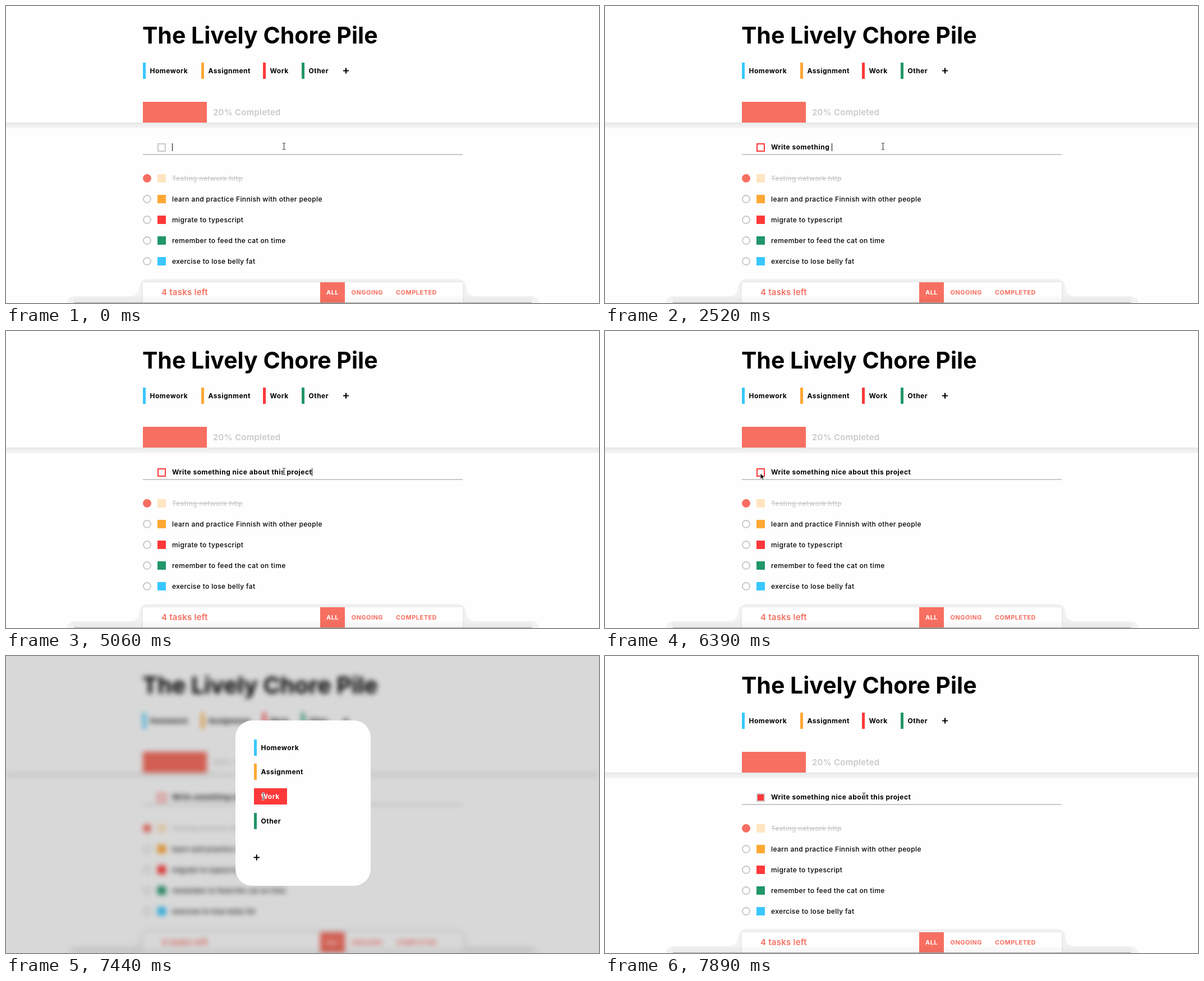
Write an HTML page that moves like this. It is 1057 px wide and 530 px high and loops after 8 s.

```html
<!DOCTYPE html>
<html lang="en">
<head>
<meta charset="utf-8">
<title>To-do list</title>
<style>
  html, body { margin: 0; width: 100%; height: 100%; overflow: hidden; background: #fefefe; }
  #stage { position: relative; width: 1057px; height: 530px; overflow: hidden; font: 500 12px Inter, sans-serif; letter-spacing: .031em; }
  #page, svg { position: absolute; left: 0; top: 0; width: 1057px; height: 530px; }
  #page.blurred { filter: blur(5px); }
  #shade { position: absolute; inset: 0; background: rgba(0, 0, 0, .15); }
  #entry { position: absolute; left: 296px; top: 245px; height: 14px; display: flex; align-items: center; white-space: pre; line-height: 14px; }
  #caret { width: 1px; height: 14px; background: #000; }
  .bold { font-weight: 700; letter-spacing: .041em; }
  .title { font-size: 41px; font-weight: 700; letter-spacing: 0; }
  .info { font-size: 15px; font-weight: 600; letter-spacing: .016em; }
  .tab { font-size: 11px; font-weight: 700; letter-spacing: .042em; fill: #f76f61; }
  .done { fill: #c9c9c9; text-decoration: line-through; }
  .panel { filter: drop-shadow(0 0 2px rgba(0, 0, 0, .08)); }
</style>
</head>
<body>
<div id="stage">
  <div id="page">
    <svg viewBox="0 0 1057 530">
      <defs>
        <linearGradient id="edge" x2="0" y2="1">
          <stop offset="0" stop-color="#e2e2e2"/>
          <stop offset=".3" stop-color="#eee"/>
          <stop offset="1" stop-color="#f5f5f5"/>
        </linearGradient>
        <linearGradient id="fade" x2="0" y2="1">
          <stop offset="0" stop-opacity=".01"/>
          <stop offset="1" stop-opacity=".04"/>
        </linearGradient>
      </defs>
      <rect width="1057" height="530" fill="#fefefe"/>
      <rect y="208" width="1057" height="10" fill="url(#edge)"/>
      <text class="title" x="243" y="67">The Lively Chore Pile</text>
      <g id="tags"></g>
      <path d="M601 115.500h10M606 110.500v10" stroke="#000" stroke-width="2.200"/>
      <rect x="244" y="171" width="114" height="37" fill="#f76f61"/>
      <text class="info" x="369" y="195" fill="#c9c9c9">20% Completed</text>
      <rect x="244" y="264" width="570" height="2" fill="#c9c9c9"/>
      <rect id="box" x="271" y="246" width="13" height="13" stroke-width="2"/>
      <g id="tasks"></g>
      <path d="M108 530Q110 518 124 518H222Q236 516 237 504Q238 487 255 487H803Q820 487 821 504Q822 516 836 518H935Q949 518 951 530Z" fill="#f2f2f2"/>
      <rect class="panel" x="244" y="493" width="570" height="40" fill="#fefefe"/>
      <rect x="560" y="493" width="44" height="37" fill="#f76f61"/>
      <rect x="120" y="518" width="818" height="12" fill="url(#fade)"/>
      <rect x="121" y="529" width="816" height="1" fill="#a2a2a2"/>
      <text class="info" x="277" y="516" fill="#f76f61">4 tasks left</text>
      <text class="tab" x="571" y="515" style="fill:#fff">ALL</text>
      <text class="tab" x="615.500" y="515">ONGOING</text>
      <text class="tab" x="695" y="515">COMPLETED</text>
    </svg>
    <div id="entry" class="bold"><span id="typed"></span><i id="caret"></i></div>
  </div>
  <div id="modal">
    <div id="shade"></div>
    <svg viewBox="0 0 1057 530">
      <rect x="409" y="115" width="241" height="295" rx="30" fill="#fefefe"/>
      <g id="choices"></g>
      <path d="M441.500 359.500h10.500M446.750 354.250v10.500" stroke="#000" stroke-width="2"/>
    </svg>
  </div>
  <svg viewBox="0 0 1057 530">
    <g id="beam" fill="none">
      <path d="M-2.500-6Q0-6 0-4Q0-6 2.500-6M0-4V4M-2.500 6Q0 6 0 4Q0 6 2.500 6" stroke="#fff" stroke-width="2.600"/>
      <path d="M-2.500-6Q0-6 0-4Q0-6 2.500-6M0-4V4M-2.500 6Q0 6 0 4Q0 6 2.500 6" stroke="#222"/>
    </g>
    <path id="arrow" d="M0 0V10.200L2.400 8L4 11.800L5.800 11L4.200 7.300H7.400Z" fill="#000" stroke="#fff" stroke-width=".8"/>
  </svg>
</div>
<script>
const $ = id => document.getElementById(id);
const GREY = '#c9c9c9', RED = '#ff3839', AMBER = '#ffa834', GREEN = '#219669', BLUE = '#39c7ff', CORAL = '#f76f61';
const LOOP = 8000;
const TEXT = 'Write something nice about this project';

const rect = (x, y, w, h, fill) => `<rect x="${x}" y="${y}" width="${w}" height="${h}" fill="${fill}"/>`;
const label = (x, y, text, cls = '', fill = '#000') =>
  `<text class="${cls}" x="${x}" y="${y}" fill="${fill}">${text}</text>`;

const tags = [['Homework', BLUE, 244], ['Assignment', AMBER, 348], ['Work', RED, 458], ['Other', GREEN, 527]];
$('tags').innerHTML = tags.map(([name, color, x]) =>
  rect(x, 101, 5, 29, color) + label(x + 12.5, 120, name, 'bold')).join('');

const drawChoices = hover => {
  $('choices').innerHTML = tags.map(([name, color], i) => {
    const y = Math.round(148.5 + i * 43.8), on = hover && name === 'Work';
    return rect(442, y, on ? 59 : 5, 29, color) +
      label(454.5, y + 18.5, name, 'bold', on ? '#fff' : '#000');
  }).join('');
};

const tasks = [
  ['Testing network http', '#ffe5c1'],
  ['learn and practice Finnish with other people', AMBER],
  ['migrate to typescript', RED],
  ['remember to feed the cat on time', GREEN],
  ['exercise to lose belly fat', BLUE]
];
$('tasks').innerHTML = tasks.map(([text, color], i) => {
  const y = 307.5 + i * 37, done = i === 0;
  return `<circle cx="251.500" cy="${y}" r="6.500" stroke-width="2" stroke="${done ? CORAL : GREY}" fill="${done ? CORAL : 'none'}"/>` +
    rect(270, y - 7.5, 15, 15, color) + label(296, y + 4, text, done ? 'done' : '');
}).join('');

// [time, letters typed]
const typing = [
  [0, 0], [740, 1], [1040, 2], [1190, 3], [1340, 5], [1480, 6], [1630, 7], [1780, 8], [1930, 10],
  [2220, 12], [2370, 14], [2520, 16], [2670, 17], [2820, 18], [2970, 20], [3120, 21], [3270, 23],
  [3570, 25], [3720, 26], [3860, 28], [4010, 30], [4160, 31], [4310, 32], [4460, 34], [4610, 35],
  [4760, 36], [4910, 38], [5060, 39]
];
const caret = [[0, 1], [450, 0], [740, 1], [5660, 0], [6100, 1], [6390, 0]];
// [time, shape, x, y]
const pointer = [
  [0, 'beam', 495.5, 250.5], [5510, 'beam', 462, 258], [5660, 'arrow', 380, 271], [5800, 'arrow', 294, 257],
  [6100, 'arrow', 280, 256], [6250, 'arrow', 278, 255], [6390, 'arrow', 277, 254],
  [6840, 'arrow', 292, 254], [6990, 'arrow', 350, 253], [7140, 'arrow', 415, 251],
  [7290, 'arrow', 450, 250], [7440, 'beam', 458.5, 250.5], [7890, 'beam', 461.5, 250]
];
const at = (steps, t) => steps.findLast(s => s[0] <= t);

let hovered = null;
function draw(t) {
  $('typed').textContent = TEXT.slice(0, at(typing, t)[1]);
  $('caret').style.visibility = at(caret, t)[1] ? 'visible' : 'hidden';

  const picked = t >= 7590, open = t >= 6690 && !picked;
  $('box').setAttribute('stroke', t < 740 || picked ? GREY : RED);
  $('box').setAttribute('fill', picked ? RED : 'none');
  $('page').classList.toggle('blurred', open);
  $('modal').style.display = open ? '' : 'none';

  const hover = t >= 7290;
  if (hover !== hovered) drawChoices(hovered = hover);

  const [, shape, x, y] = at(pointer, t);
  for (const id of ['beam', 'arrow']) $(id).style.display = id === shape ? '' : 'none';
  $(shape).setAttribute('transform', `translate(${x} ${y})`);
}

const start = performance.now();
function tick() {
  draw((performance.now() - start) % LOOP);
  requestAnimationFrame(tick);
}
tick();
</script>
</body>
</html>
```
